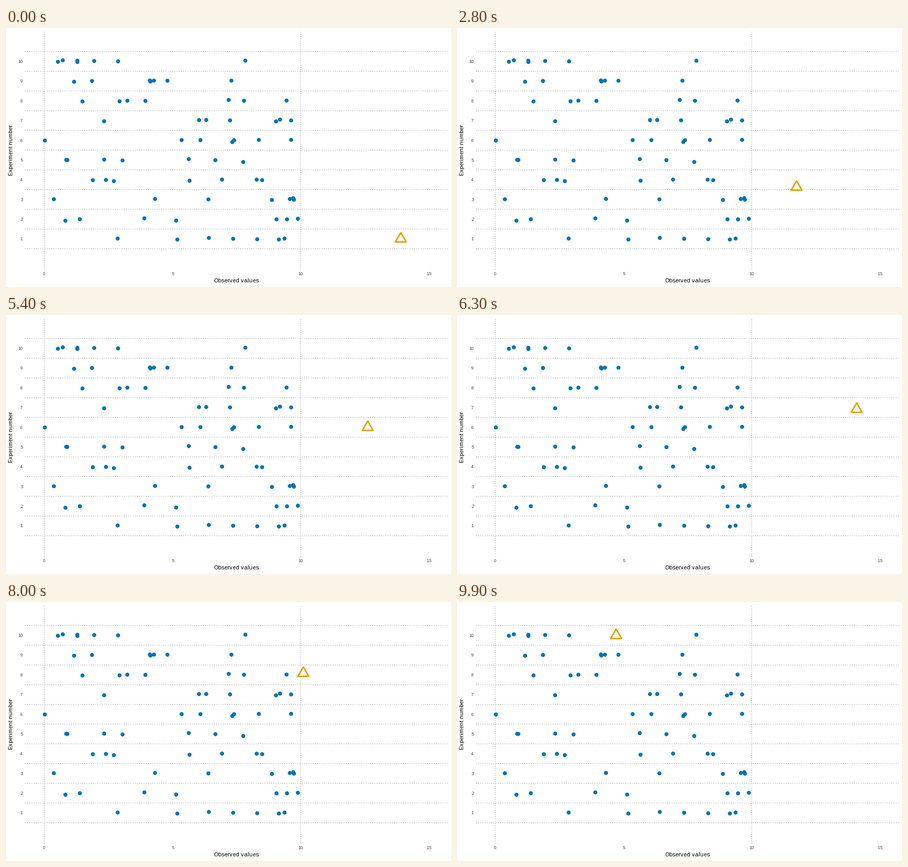
Write a matplotlib script that moves like this. It is 864 px wide and 504 px high and loops after 10000 ms.

```python
import numpy as np
import matplotlib.pyplot as plt
from matplotlib.animation import FuncAnimation
from matplotlib.patches import Circle, Polygon

W, H, DPI = 864, 504, 72
FRAMES, STEP_MS, HOLD = 100, 100, 11
ROWS, SAMPLE = 10, 7
BLUE, ORANGE, GREY, DOTTED = "#0072B2", "#E69F00", "#4D4D4D", "#7F7F7F"

# Panel edges in pixels, y counted from the top
LEFT, RIGHT, TOP, BOTTOM = 36.96, 858.5, 5.5, 469.8
UNIT_X = (RIGHT - LEFT) / 16.5
UNIT_Y = (BOTTOM - TOP) / 12.1

plt.rcParams.update({
    "font.family": "Liberation Sans",
    "text.hinting": "force_autohint",
    "text.hinting_factor": 1,
    "toolbar": "None",
})


def r_uniform(seed, n):
    """Uniform draws as R gives them after set.seed(seed)."""
    states = []
    for _ in range(50 + 625):
        seed = (69069 * seed + 1) % 2**32
        states.append(seed)
    rng = np.random.RandomState()
    rng.set_state(("MT19937", np.array(states[-624:], dtype=np.uint32), 624))
    return rng.randint(0, 2**32, size=n, dtype=np.uint32) / 2**32


def normal_quantile(u):
    return 4.91 * (u**0.14 - (1 - u)**0.14)


def px(value):
    return LEFT + (value + 0.75) * UNIT_X


def py(row):
    return BOTTOM - (row + 0.55) * UNIT_Y


def ease(t):
    return 4 * t**3 if t < 0.5 else 1 - 4 * (1 - t)**3


def triangle(x, y, r=12.16):
    dx = r * 3**0.5 / 2
    return [(x, y - r), (x + dx, y + r / 2), (x - dx, y + r / 2)]


def dotted(xs, ys):
    ax.plot(xs, ys, color=DOTTED, lw=1.067, ls=(0, (1, 3)),
            dash_capstyle="butt", snap=False, zorder=1)


def label(x, y, text, size=8.8, color=GREY, ha="center", **kw):
    ax.text(x, y, text, size=size, color=color, ha=ha, va="baseline", **kw)


# Each experiment draws 7 values, then 7 normal jitters of two uniforms each
draws = r_uniform(42, ROWS * SAMPLE * 3).reshape(ROWS, SAMPLE * 3)
values = 10 * draws[:, :SAMPLE]
jitter = 0.03 * normal_quantile(draws[:, SAMPLE::2])
estimates = 2 * values.mean(axis=1)

fig = plt.figure(figsize=(W / DPI, H / DPI), dpi=DPI, facecolor="white")
ax = fig.add_axes([0, 0, 1, 1])
ax.set_xlim(0, W)
ax.set_ylim(H, 0)
ax.axis("off")

for i in range(ROWS + 1):
    dotted([LEFT, RIGHT], [py(i + 0.5)] * 2)
for v in (0, 10):
    dotted([px(v)] * 2, [BOTTOM, TOP])

for i in range(ROWS):
    label(32, py(i + 1) + 3.1, str(i + 1), ha="right")
    for v, dy in zip(values[i], jitter[i]):
        ax.add_patch(Circle((px(v), py(i + 1 + dy)), 3.91, fc=BLUE, lw=0, zorder=2))

for v in (0, 5, 10, 15):
    label(px(v), 481, str(v))
label((LEFT + RIGHT) / 2, 494.9, "Observed values", 11, "black")
label(13.4, (TOP + BOTTOM) / 2, "Experiment number", 11, "black",
      rotation=90, rotation_mode="anchor")

marker = Polygon(triangle(px(estimates[0]), py(1)), closed=True, fill=False,
                 ec=ORANGE, lw=2.83, joinstyle="round", zorder=3)
ax.add_patch(marker)


def update(frame):
    i, step = divmod(frame, HOLD)
    t = ease(step / HOLD)
    start, end = estimates[i], estimates[min(i + 1, ROWS - 1)]
    marker.set_xy(triangle(px(start + (end - start) * t), py(i + 1 + t)))
    return [marker]


anim = FuncAnimation(fig, update, frames=FRAMES, interval=STEP_MS,
                     repeat=True, repeat_delay=0)
plt.show()
```
